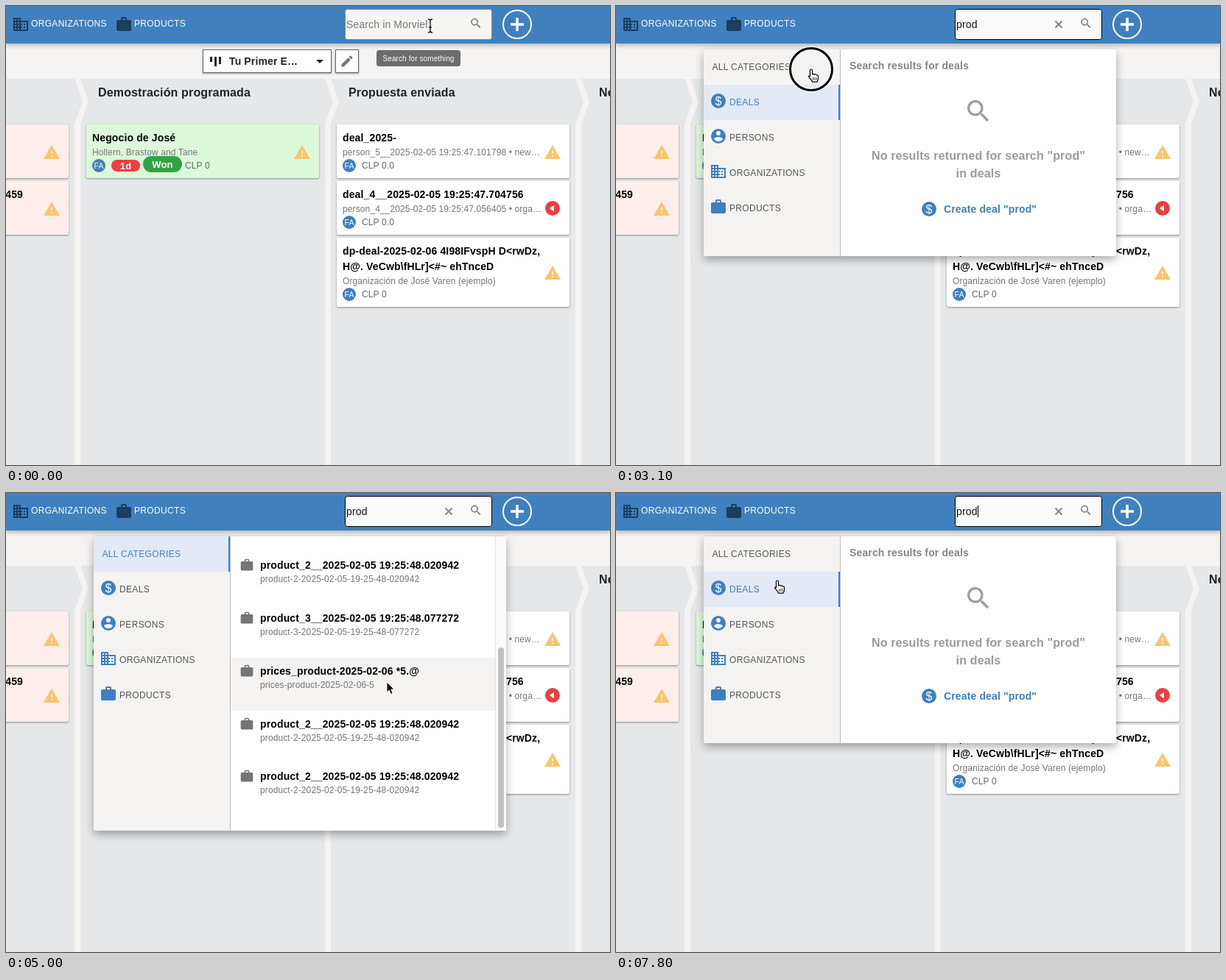
Recreate the animation shown at these times as an HTML page. Size 820 by 624 pixels, loop 7.9 s.

```html
<!DOCTYPE html>
<html lang="en">
<head>
<meta charset="utf-8">
<title>Pipeline search</title>
<style>
html, body { margin: 0; width: 100%; height: 100%; overflow: hidden; background: #f4f3f2; }
svg { display: block; }
text { font-family: "Liberation Sans", Arial, sans-serif; letter-spacing: .0094em; white-space: pre; }
.caps { letter-spacing: .0286em; }
.bold { font-weight: 700; }
.drop { filter: drop-shadow(0 5px 6px rgba(0, 0, 0, .32)); }
.card { filter: drop-shadow(0 1px 1px rgba(0, 0, 0, .4)); }
.bar { filter: drop-shadow(0 2px 3px rgba(0, 0, 0, .3)); }
</style>
</head>
<body>
<svg id="stage" width="820" height="624" viewBox="0 0 820 624"></svg>
<script>
const LOOP = 7900, STEP = 100;
const BLUE = '#3f7fbf', GREY = '#757575', PALE = '#f4f3f2';

const ICONS = {
  work: 'M20 6h-4V4c0-1.1-.9-2-2-2h-4c-1.1 0-2 .9-2 2v2H4c-1.1 0-2 .9-2 2v11c0 1.1.9 2 2 2h16c1.1 0 2-.9 2-2V8c0-1.1-.9-2-2-2zm-6 0h-4V4h4z',
  warning: 'M1 21h22L12 2zM13 18h-2v-2h2zM13 14h-2v-4h2z',
  search: 'M15.5 14h-.8l-.3-.3A6.5 6.5 0 1 0 13.7 14.4l.3.3v.8l5 5 1.5-1.5zM9.5 14a4.5 4.5 0 1 1 0-9 4.5 4.5 0 0 1 0 9z',
  edit: 'M3 17.2V21h3.8L17.8 9.9l-3.7-3.7zM20.7 7c.4-.4.4-1 0-1.4l-2.3-2.3c-.4-.4-1-.4-1.4 0l-1.9 1.8 3.8 3.8z',
  person: 'M12 2a10 10 0 1 0 0 20 10 10 0 0 0 0-20zM12 5a3 3 0 1 1 0 6 3 3 0 0 1 0-6zM12 19.2c-2.5 0-4.7-1.3-6-3.2 0-2 4-3.1 6-3.1s6 1.1 6 3.1c-1.3 1.9-3.5 3.2-6 3.2z',
  business: 'M2 3h10v4h10v14H2z' +
    [4, 8].flatMap(x => [5, 9, 13, 17].map(y => `M${x} ${y}h2v2h-2z`)).join('') +
    'M12 9h8v10h-8v-2h2v-2h-2v-2h2v-2h-2zM16 11h2v2h-2zM16 15h2v2h-2z'
};

const escapeText = s => s.replace(/&/g, '&amp;').replace(/</g, '&lt;');
const text = (x, y, s, size, fill = '#000', cls = '', anchor = 'start') =>
  `<text x="${x}" y="${y}" font-size="${size}" fill="${fill}" class="${cls}" text-anchor="${anchor}">${escapeText(s)}</text>`;
const bold = (x, y, s, size = 14, fill = '#000', anchor) => text(x, y, s, size, fill, 'bold', anchor);
const rect = (x, y, w, h, fill, more = '') =>
  `<rect x="${x}" y="${y}" width="${w}" height="${h}" fill="${fill}" ${more}/>`;
const circle = (x, y, r, fill, more = '') => `<circle cx="${x}" cy="${y}" r="${r}" fill="${fill}" ${more}/>`;
const path = (d, fill, more = '') => `<path d="${d}" fill="${fill}" ${more}/>`;
const group = (id, body, more = '') => `<g id="${id}" ${more}>${body}</g>`;
const icon = (name, x, y, fill, size = 24) =>
  path(ICONS[name], fill, `fill-rule="evenodd" transform="translate(${x} ${y}) scale(${size / 24})"`);
const dollar = (x, y) => circle(x, y, 10, BLUE) + text(x, y + 5.5, '$', 16, '#fff', '', 'middle');
const warning = (x, y) => icon('warning', x - 12, y - 11, '#f9c56c');
const avatar = (x, y) => circle(x, y, 9, BLUE) + text(x, y + 3.8, 'FA', 10.5, '#fff', '', 'middle');
const card = (x, y, w, h, fill = '#fff') => rect(x, y, w, h, fill, 'rx="2" class="card"');

function board() {
  const divider = x => path(`M${x} 98h8l11 32-11 30v464h-8V160l11-30z`, PALE);
  const deal = (y, title, sub) => card(449, y, 316, 73) + bold(457, y + 23, title) +
    text(457, y + 42, sub, 12, GREY) + avatar(466, y + 56) + text(483, y + 60, 'CLP 0.0', 12, '#666');
  return rect(0, 0, 820, 624, PALE) + rect(0, 99, 820, 525, '#e5e7e9') +
    [93, 433, 773].map(divider).join('') +
    bold(125, 123, 'Demostración programada', 16, '#222') +
    bold(465, 123, 'Propuesta enviada', 16, '#222') + bold(805, 123, 'Negociación', 16, '#222') +
    card(-10, 161, 95, 73, '#fdeeec') + card(-10, 238, 95, 73, '#fdeeec') +
    warning(62, 198) + warning(62, 275) + bold(23, 261, '459', 14, '#000', 'end') +
    card(109, 161, 316, 73, '#dcf9da') + bold(117, 184, 'Negocio de José') +
    text(117, 203, 'Hollern, Brastow and Tane', 12, GREY) + avatar(126, 217) +
    rect(143, 209, 39, 16, '#ef3d3f', 'rx="8"') + bold(162.5, 221.5, '1d', 13, '#fff', 'middle') +
    rect(186, 204, 53, 22, '#30a443', 'rx="11"') + bold(212.5, 219.5, 'Won', 13, '#fff', 'middle') +
    text(243, 221, 'CLP 0', 12, '#666') + warning(402, 198) +
    deal(161, 'deal_2025-', 'person_5__2025-02-05 19:25:47.101798 • new…') + warning(742, 198) +
    deal(238, 'deal_4__2025-02-05 19:25:47.704756', 'person_4__2025-02-05 19:25:47.056405 • orga…') +
    circle(742, 275, 10, '#ef3d3f') + path('M738 275l6-4.5v9z', '#fff') +
    card(449, 315, 316, 94) + bold(457, 338, 'dp-deal-2025-02-06 4I98IFvspH D<rwDz,') +
    bold(457, 359, 'H@. VeCwb\\fHLr]<#~ ehTnceD') +
    text(457, 378, 'Organización de José Varen (ejemplo)', 12, GREY) +
    avatar(466, 392) + text(483, 396, 'CLP 0', 12, '#666') + warning(742, 362);
}

function toolbar() {
  const button = (x, w) => rect(x + .5, 59.5, w, 31, '#fff', 'stroke="#666" class="card"');
  return button(267, 174) + button(447, 31) +
    rect(277, 69, 3, 7, '#222') + rect(283, 69, 3, 13, '#222') + rect(289, 69, 3, 10, '#222') +
    bold(303, 80, 'Tu Primer E…', 14, '#222') + path('M421 73h10l-5 5z', '#222') +
    icon('edit', 453, 65, GREY, 20);
}

function header() {
  const dark = '#1b3d5e';
  return rect(0, 0, 820, 51, '#4080be', 'class="bar"') +
    icon('business', 8, 13, dark) + text(34, 28, 'ORGANIZATIONS', 12, '#fff', 'caps') +
    icon('work', 148, 13, dark) + text(174, 28, 'PRODUCTS', 12, '#fff', 'caps') +
    circle(694, 25, 19, 'none', 'stroke="#fff" stroke-width="2"') +
    path('M685 25h18M694 16v18', 'none', 'stroke="#fff" stroke-width="3.6"') +
    rect(460.5, 4.5, 199, 41, '#f5f5f4', 'id="field" rx="3"') +
    text(462, 30, '', 14, '#000').replace('<text', '<text id="query"') +
    rect(491, 17, 1, 16, '#000', 'id="caret"') +
    icon('search', 629, 14.5, GREY, 18) +
    path('M596.5 20.5l9 9M605.5 20.5l-9 9', 'none', 'id="clear" stroke="#858585" stroke-width="2"') +
    circle(601, 25, 9.5, 'none', `id="spinner" pathLength="127" stroke="${BLUE}" stroke-width="2"`);
}

const CATEGORIES = ['ALL CATEGORIES', 'DEALS', 'PERSONS', 'ORGANIZATIONS', 'PRODUCTS'];
const product = (n, time) => [`product_${n}__2025-02-05 ${time}`,
  `product-${n}-2025-02-05-${time.replace(/[:.]/g, '-')}`];
const second = product(2, '19:25:48.020942');
const ITEMS = [
  ['Producto ejemplar (ejemplo)', 'producto-ejemplar-ejemplo'],
  product(0, '19:25:47.754096'), product(1, '19:25:47.953902'), second,
  product(3, '19:25:48.077272'), ['prices_product-2025-02-06 *5.@', 'prices-product-2025-02-06-5'],
  second, second
];

function panel() {
  const side = dollar(139, 129) + icon('person', 127, 165, BLUE) +
    icon('business', 127, 213, BLUE) + icon('work', 127, 261, BLUE) +
    CATEGORIES.map((name, i) => text(i ? 154 : 130.5, 87 + 48 * i, name, 12, '#555', 'caps category')).join('');
  const none = icon('search', 472, 123, '#9e9e9e', 40) +
    bold(492, 209, 'No results returned for search "prod"', 16, '#9a9a9a', 'middle') +
    bold(492, 233, 'in deals', 16, '#9a9a9a', 'middle') +
    dollar(425, 276) + bold(445, 281, 'Create deal "prod"', 14, BLUE);
  const rows = ITEMS.map(([title, sub], i) => {
    const y = 99 + 72 * i - (i === 7 ? 1 : 0);
    return icon('work', 317, y + 8, GREY, 20) + bold(345, y + 23, title) + text(345, y + 41, sub, 12, GREY);
  }).join('');
  return rect(119, 59, 560, 240, '#fff', 'id="sheet" rx="4" class="drop"') +
    rect(119, 59, 185, 240, PALE, 'id="side" rx="3"') + rect(304, 59, 1, 240, '#bdbdbd', 'id="rule"') +
    group('selected', rect(119, 59, 183, 48, '#e3e9f5') + rect(302, 59, 2, 48, BLUE)) + side +
    `<clipPath id="view"><rect x="305" y="59" width="374" height="400"/></clipPath>` +
    group('results', group('content', rect(305, 99, 359, 72, PALE, 'id="hover"') +
      bold(317, 86, '', 14, '#858585').replace('<text', '<text id="heading"') + group('rows', rows)),
      'clip-path="url(#view)"') +
    group('none', none) +
    group('loading', text(460, 122, 'Loading...', 14, '#999')) +
    group('scrollbar', rect(664, 59, 15, 400, '#fafafa') + rect(664, 59, 1, 400, '#e4e4e4') +
      rect(668, 62, 8, 245, '#c1c1c1', 'id="thumb" rx="4"'));
}

function pointers() {
  const beam = 'M-3-9q3 0 3 2q0-2 3-2M0-7V7M-3 9q3 0 3-2q0 2 3 2M-2 2h4';
  const hand = 'M-1.5 1q1.5-2 3 0v6q2-1.5 3 .3q2-1 2.8.7q2-.6 2.2 1.2v3q0 2-1.5 5H1.5q-1-2.5-5-7q0-2 2 -.5z';
  return group('ring', circle(0, 0, 28.5, 'none', 'stroke="#fff" stroke-width="6" opacity=".7"') +
      circle(0, 0, 28.5, 'none', 'stroke="#000" stroke-width="3"')) +
    group('beam', path(beam, 'none', 'stroke="#fff" stroke-width="3" opacity=".7"') +
      path(beam, 'none', 'stroke="#000" stroke-width="1.3"')) +
    group('hand', path(hand, '#fff', 'stroke="#000" stroke-width="1.2" stroke-linejoin="round"') +
      path('M2.5 11v4M4.7 11v4M6.9 11v4', 'none', 'stroke="#000" stroke-width=".8"')) +
    group('arrow', path('M0 0v14l3.2-3 2.3 5.4 2.6-1.1-2.3-5.3h4.3z', '#000', 'stroke="#fff"'));
}

document.getElementById('stage').innerHTML = board() + group('toolbar', toolbar()) + header() +
  group('panel', panel()) +
  group('tooltip', rect(503, 60, 114, 22, '#616161', 'rx="4" opacity=".92"') +
    text(560, 75, 'Search for something', 10, '#fff', '', 'middle')) + pointers();

const el = Object.fromEntries([...document.querySelectorAll('[id]')].map(n => [n.id, n]));
const labels = document.querySelectorAll('.category');
const show = (node, on) => node.setAttribute('visibility', on ? 'inherit' : 'hidden');
const set = (node, attrs) => Object.entries(attrs).forEach(([k, v]) => node.setAttribute(k, v));
const move = (node, x, y) => node.setAttribute('transform', `translate(${x} ${y})`);
const smooth = x => (x = Math.max(0, Math.min(1, x)), x * x * (3 - 2 * x));
const latest = (list, t) => list.filter(entry => entry[0] <= t).pop();

// [time, panel content, selected category]
const PHASES = [[0, ''], [1300, 'loading', 1], [2100, 'none', 1], [3200, ''], [3400, 'loading', 0],
  [3700, 'rows', 0], [6200, ''], [6300, 'loading', 1], [6700, 'none', 1]];
const HEIGHT = { loading: 240, none: 281, rows: 400 };
const SPINS = [[1320, 2100], [3235, 3700], [6135, 6700]];
// [time, typed text, caret x]
const KEYS = [[200, '', 463], [700, 'p', 470], [800, 'pr', 475], [1200, 'pro', 483], [1500, 'prod', 491]];
// [time, x, y]
const TRACK = [[0, 576, 27], [2400, 576, 27], [3000, 265, 86], [3500, 265, 86], [4000, 374, 137],
  [4100, 374, 137], [4600, 517, 257], [5200, 517, 257], [5400, 533, 250], [6000, 213, 110],
  [6800, 213, 110], [7000, 215, 119], [7700, 215, 119], [7800, 219, 119], [LOOP, 219, 119]];

function pointerAt(t) {
  const i = TRACK.findIndex(k => k[0] > t);
  const [t0, x0, y0] = TRACK[i - 1], [t1, x1, y1] = TRACK[i];
  const k = smooth((t - t0) / (t1 - t0));
  return [x0 + (x1 - x0) * k, y0 + (y1 - y0) * k];
}

function drawField(t) {
  const focused = t >= 200, key = latest(KEYS, t), typed = key ? key[1] : '';
  const spin = SPINS.find(([a, b]) => t >= a && t < b);
  set(el.field, { fill: focused ? '#f9faf9' : '#f5f5f4', stroke: focused ? '#000' : '#888' });
  el.query.textContent = typed || 'Search in Morviel';
  el.query.setAttribute('fill', typed ? '#111' : '#777');
  show(el.caret, key && (t - key[0]) % 1000 < 500);
  if (key) el.caret.setAttribute('x', key[2]);
  show(el.clear, t >= 2100 && !spin);
  show(el.spinner, spin);
  if (!spin) return;
  const p = (t - spin[0]) / 1400 % 1, grow = smooth(p * 2), slide = smooth(p * 2 - 1);
  set(el.spinner, {
    'stroke-dasharray': `${1 + 99 * grow} 200`,
    'stroke-dashoffset': -15 * grow - 110 * slide,
    transform: `rotate(${360 * p} 601 25)`
  });
}

function drawPanel(t, mode, category, y) {
  show(el.panel, mode);
  show(el.toolbar, !mode);
  if (!mode) return;
  const all = mode === 'rows', scroll = all ? 235 * smooth((t - 4100) / 500) : 0;
  for (const part of [el.sheet, el.side, el.rule]) part.setAttribute('height', HEIGHT[mode]);
  move(el.selected, 0, 48 * category);
  labels.forEach((label, i) => label.setAttribute('fill', i === category ? BLUE : '#555'));
  el.heading.textContent = category ? 'Search results for deals' : 'All search results';
  for (const name of ['none', 'loading', 'rows']) show(el[name], mode === name);
  show(el.scrollbar, all);
  move(el.content, 0, -scroll);
  move(el.thumb, 0, scroll * .63);
  const row = t < 5200 ? Math.floor((y + scroll - 99) / 72) : 5;
  show(el.hover, all && row >= 0 && t >= 3800);
  el.hover.setAttribute('y', 99 + 72 * row);
}

function draw(t) {
  const [, mode, category] = latest(PHASES, t), [x, y] = pointerAt(t);
  drawField(t);
  drawPanel(t, mode, category, y);
  show(el.tooltip, t < 2600);
  const inField = y < 46 && x > 460, overTitle = t >= 6200 && t < 6300;
  const kind = inField || overTitle ? 'beam' : mode && x < 304 ? 'hand' : 'arrow';
  const visible = t < 400 || t >= 2500;
  for (const name of ['beam', 'hand', 'arrow']) {
    show(el[name], visible && name === kind);
    move(el[name], x, y);
  }
  show(el.ring, t === 3100 || t === 6100);
  move(el.ring, x, y);
}

const start = performance.now();
function tick() {
  const t = (performance.now() - start) % LOOP;
  draw(Math.floor(t / STEP) * STEP);
  requestAnimationFrame(tick);
}
tick();
</script>
</body>
</html>
```
